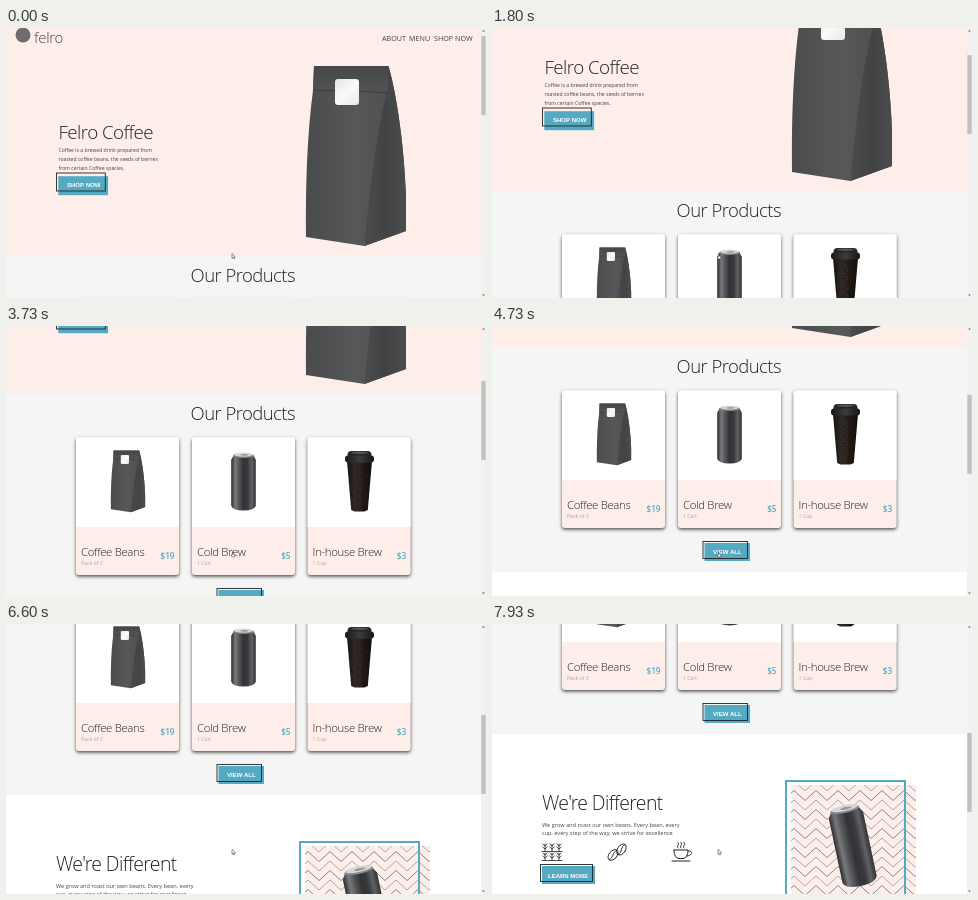
Animation of 480x270 px, one loop 8 s. Source, as an HTML page with a canvas:

```html
<!DOCTYPE html>
<html lang="en">
<head>
<meta charset="utf-8">
<title>Coffee shop page</title>
<style>
html, body { margin: 0; width: 100%; height: 100%; overflow: hidden; background: #fff; }
canvas { display: block; width: 480px; height: 270px; }
</style>
</head>
<body>
<canvas id="stage"></canvas>
<script>
const canvas = document.getElementById('stage');
const dpr = window.devicePixelRatio || 1;
canvas.width = 480 * dpr;
canvas.height = 270 * dpr;
const c = canvas.getContext('2d');

const LOOP = 8000, NOTCH = 40.4, GLIDE = 520;
const NOTCHES = [-270, 740, 1680, 2690, 3475, 4420, 5262, 6340, 7250];
const TEAL = '#55aac3', PINK = '#feeeea', SANS = '"Open Sans", "Noto Sans", sans-serif';

// Sum of eased wheel notches; the loop opens in the middle of the first.
function scrollAt(t) {
  const sum = NOTCHES.reduce((s, start) => {
    const p = Math.min(1, Math.max(0, (t - start) / GLIDE));
    return s + p * p * (3 - 2 * p);
  }, 0);
  return Math.max(0, Math.round(sum * NOTCH - 20.9));
}

function rect(x, y, w, h, fill) {
  c.fillStyle = fill;
  c.fillRect(x, y, w, h);
}

function text(str, x, y, size, { weight = 400, color = '#444', align = 'left', family = SANS, gap = 0 } = {}) {
  c.font = `${weight} ${size}px ${family}`;
  c.letterSpacing = gap * size + 'px';
  c.textAlign = align;
  c.fillStyle = color;
  c.fillText(str, x, y);
}

function light(str, x, y, size, align) {
  text(str, x, y, size, { weight: 300, color: '#222', gap: -0.03, align });
}

function poly(points, fill) {
  c.beginPath();
  points.forEach(([x, y]) => c.lineTo(x, y));
  c.closePath();
  c.fillStyle = fill;
  c.fill();
}

function blend(x0, y0, x1, y1, ...colors) {
  const g = c.createLinearGradient(x0, y0, x1, y1);
  colors.forEach((col, i) => g.addColorStop(i / (colors.length - 1), col));
  return g;
}

function oval(x, y, rx, ry, fill) {
  c.beginPath();
  c.ellipse(x, y, rx, ry, 0, 0, Math.PI * 2);
  c.fillStyle = fill;
  c.fill();
}

function at(x, y, scale, angle, draw) {
  c.save();
  c.translate(x, y);
  c.rotate(angle);
  c.scale(scale, scale);
  draw();
  c.restore();
}

function bag() {
  c.beginPath();
  c.moveTo(9, 0);
  c.lineTo(83.5, 0);
  c.bezierCurveTo(91, 26, 99, 75, 101, 130);
  c.lineTo(101, 165);
  c.lineTo(59.5, 180);
  c.lineTo(1, 171);
  c.bezierCurveTo(0.5, 120, 2, 70, 8, 24);
  c.closePath();
  c.fillStyle = blend(0, 0, 101, 0, '#4a4b4d', '#57585a', '#4b4c4e');
  c.fill();

  c.beginPath();
  c.moveTo(83.5, 0);
  c.bezierCurveTo(91, 26, 99, 75, 101, 130);
  c.lineTo(101, 165);
  c.lineTo(59.5, 180);
  c.bezierCurveTo(64, 130, 71, 70, 82, 25);
  c.closePath();
  c.fillStyle = blend(60, 0, 101, 0, '#4a4b4d', '#424345', '#4b4c4e');
  c.fill();

  poly([[9, 0], [83.5, 0], [82.5, 26], [8, 23.5]], blend(0, 0, 0, 25, '#454648', '#525355'));
  c.strokeStyle = '#38393b';
  c.lineWidth = 1;
  c.beginPath();
  c.moveTo(8, 24);
  c.lineTo(82.5, 26.5);
  c.stroke();
  c.beginPath();
  c.roundRect(30, 13, 24, 26, 3);
  c.fillStyle = blend(30, 13, 54, 39, '#e4e4e5', '#fafafa', '#e8e8e9');
  c.fill();
}

function can() {
  c.beginPath();
  c.moveTo(-9.5, -27);
  c.lineTo(-12.3, -22);
  c.lineTo(-12.3, 24);
  c.quadraticCurveTo(-11, 28.5, 0, 28.8);
  c.quadraticCurveTo(11, 28.5, 12.3, 24);
  c.lineTo(12.3, -22);
  c.lineTo(9.5, -27);
  c.closePath();
  c.fillStyle = blend(-12.3, 0, 12.3, 0, '#2a2b2d', '#77797c', '#505255', '#313335', '#37393b', '#5f6164', '#303234');
  c.fill();
  oval(0, -26.3, 10.3, 2.6, '#85878a');
  oval(0, -27.2, 9.6, 2, '#d5d7d8');
  oval(1, -27, 4, 0.9, '#97999b');
}

function cup() {
  poly([[-12.5, -21], [12.5, -21], [8.3, 28], [5, 29.5], [-5, 29.5], [-8.3, 28]],
    blend(-13, 0, 13, 0, '#15110f', '#302823', '#1f1916', '#110e0c'));
  c.fillStyle = '#4a3c32';
  for (let i = 0; i < 14; i++) c.fillRect(-1 + (i % 3), -15 + i * 3, 1.2, 1.2);
  c.beginPath();
  c.roundRect(-12, -31, 24, 9, 4);
  c.fillStyle = '#252525';
  c.fill();
  c.beginPath();
  c.roundRect(-14.5, -26.5, 29, 7, 3);
  c.fillStyle = blend(-15, 0, 15, 0, '#181818', '#3c3c3c', '#151515');
  c.fill();
  oval(0, -29.3, 8.5, 1.3, '#555');
}

function button(label, x, y, w, h, dx, dy, tx, ty) {
  rect(x + dx, y + dy, w, h, TEAL);
  c.strokeStyle = '#222';
  c.lineWidth = 0.9;
  c.strokeRect(x + 0.5, y + 0.5, w - 1, h - 1);
  text(label, tx, ty, 6, { weight: 700, color: '#fff', family: '"Liberation Sans", Arial, sans-serif' });
}

function card(x, title, note, price, draw) {
  c.save();
  c.shadowColor = 'rgba(0,0,0,.7)';
  c.shadowBlur = 3.5 * dpr;
  c.shadowOffsetY = 1.5 * dpr;
  c.beginPath();
  c.roundRect(x, 271.3, 103, 137.7, 3);
  c.fillStyle = PINK;
  c.fill();
  c.restore();
  c.beginPath();
  c.roundRect(x, 271.3, 103, 89.7, [3, 3, 0, 0]);
  c.fillStyle = '#fff';
  c.fill();
  draw();
  text(title, x + 5, 390, 11.4, { weight: 300, color: '#222', gap: -0.03 });
  text(note, x + 5, 398.6, 5.2, { color: '#aaa3a2' });
  text(price, x + 98.5, 393, 8.2, { weight: 600, color: TEAL, align: 'right' });
}

function pen(width, draw) {
  c.strokeStyle = '#222';
  c.lineWidth = width;
  c.lineCap = 'round';
  c.beginPath();
  draw();
  c.stroke();
}

function sprouts() {
  for (let row = 0; row < 2; row++) {
    const y = row * 9;
    pen(0.8, () => {
      c.moveTo(0, y + 8.5);
      c.lineTo(20, y + 8.5);
      for (let x = 3; x < 20; x += 7) {
        c.moveTo(x, y + 8);
        c.lineTo(x, y + 1);
        for (const h of [3, 6]) {
          c.moveTo(x - 2.3, y + h - 2);
          c.lineTo(x, y + h);
          c.lineTo(x + 2.3, y + h - 2);
        }
      }
    });
  }
}

function bean() {
  pen(1, () => {
    c.ellipse(0, 0, 4.4, 6.8, 0, 0, Math.PI * 2);
    c.moveTo(0, -6.8);
    c.bezierCurveTo(-3, -2, 3, 2, 0, 6.8);
  });
}

function mug() {
  pen(1, () => {
    c.moveTo(2, 8);
    c.lineTo(16, 8);
    c.bezierCurveTo(16, 13, 14, 16.5, 11, 16.5);
    c.lineTo(7, 16.5);
    c.bezierCurveTo(4, 16.5, 2, 13, 2, 8);
    c.moveTo(16, 9);
    c.bezierCurveTo(21, 8, 21, 14, 14.5, 14);
    c.moveTo(0, 19);
    c.lineTo(18, 19);
    for (const x of [6, 9, 12]) {
      c.moveTo(x, 6);
      c.bezierCurveTo(x - 2, 4, x + 2, 3, x, 0.5);
    }
  });
}

function zigzags() {
  c.save();
  c.beginPath();
  c.rect(299, 504, 125, 121);
  c.clip();
  rect(299, 504, 125, 121, PINK);
  c.lineWidth = 1;
  c.lineJoin = 'miter';
  for (let i = 0; i < 15; i++) {
    const y = 500 + i * 9.5;
    c.strokeStyle = i % 2 ? '#848b91' : '#a5abb0';
    c.beginPath();
    for (let k = 0; k < 14; k++) c.lineTo(291 + k * 11, y + (k % 2 ? 0 : 10));
    c.stroke();
  }
  c.restore();
}

function page() {
  rect(0, 0, 475, 228, PINK);
  rect(0, 228, 475, 225, '#f5f5f5');

  oval(17, 7, 7.5, 7.5, '#6f6c6c');
  text('felro', 28, 14.5, 15, { weight: 300, gap: -0.02 });
  text('ABOUT', 376, 13, 7.2);
  text('MENU', 403, 13, 7.2);
  text('SHOP NOW', 428, 13, 7.2);
  light('Felro Coffee', 52.5, 111, 18.8);
  ['Coffee is a brewed drink prepared from',
   'roasted coffee beans, the seeds of berries',
   'from certain Coffee species.'].forEach((s, i) => text(s, 52.5, 123.5 + i * 9, 5.1));
  button('SHOP NOW', 50, 144.5, 49.8, 19, 2.3, 3.7, 61, 159);
  at(299, 38, 1, 0, bag);

  light('Our Products', 236.8, 254, 18.5, 'center');
  card(70, 'Coffee Beans', 'Pack of 3', '$19', () => at(104.5, 284.5, 0.343, 0, bag));
  card(186, 'Cold Brew', '1 Can', '$5', () => at(237.5, 315.8, 1, 0, can));
  card(301.6, 'In-house Brew', '1 Cup', '$3', () => at(353.5, 316, 1, 0, cup));
  button('VIEW ALL', 210.5, 422, 45.5, 18, 2, 2, 221, 435);

  light("We're Different", 50, 529, 19.4);
  text('We grow and roast our own beans. Every bean, every', 50, 546, 5.6);
  text('cup, every step of the way, we strive for excellence', 50, 554, 5.6);
  at(50, 562, 1, 0, sprouts);
  at(121, 574, 0.9, 0.7, bean);
  at(129.5, 568.5, 0.9, 0.6, bean);
  at(180, 561, 1, 0, mug);
  button('LEARN MORE', 48, 583, 53, 18, 2, 2, 56, 597);

  zigzags();
  at(360.5, 565, 1.42, -0.21, can);
  c.strokeStyle = TEAL;
  c.lineWidth = 2;
  c.strokeRect(294, 500, 119, 119);
}

function scrollbar(s) {
  rect(475, 0, 5, 270, '#f1f1f1');
  rect(475.3, 8 + s * 0.294, 4.4, 79, '#c1c1c1');
  poly([[476.2, 3.5], [477.5, 2], [478.8, 3.5]], '#555');
  poly([[476.2, 266.5], [477.5, 268], [478.8, 266.5]], '#555');
}

function pointer(s) {
  const y = 226 + s;
  if (y > 235 && y < 270) {
    pen(0.7, () => {
      c.moveTo(224.8, 224);
      c.lineTo(227.2, 224);
      c.moveTo(226, 224);
      c.lineTo(226, 228.5);
      c.moveTo(224.8, 228.5);
      c.lineTo(227.2, 228.5);
    });
    return;
  }
  const hand = (y > 271 && y < 409) || (y > 422 && y < 442);
  const shape = hand
    ? [[226, 226], [227, 226], [227, 228], [229, 228.5], [228.6, 231], [226.4, 231], [225, 229], [226, 229]]
    : [[226, 225.5], [226, 230.3], [227.1, 229.4], [227.8, 231], [228.6, 230.6], [227.9, 229], [229.2, 228.9]];
  poly(shape, '#fff');
  c.strokeStyle = '#222';
  c.lineWidth = 0.5;
  c.stroke();
}

function frame(now) {
  const s = scrollAt(now % LOOP);
  c.setTransform(dpr, 0, 0, dpr, 0, 0);
  rect(0, 0, 480, 270, '#fff');
  c.save();
  c.translate(0, -s);
  page();
  c.restore();
  scrollbar(s);
  pointer(s);
}

let begin;
function tick(now) {
  begin ??= now;
  frame(now - begin);
  requestAnimationFrame(tick);
}
frame(0);
requestAnimationFrame(tick);
</script>
</body>
</html>
```
